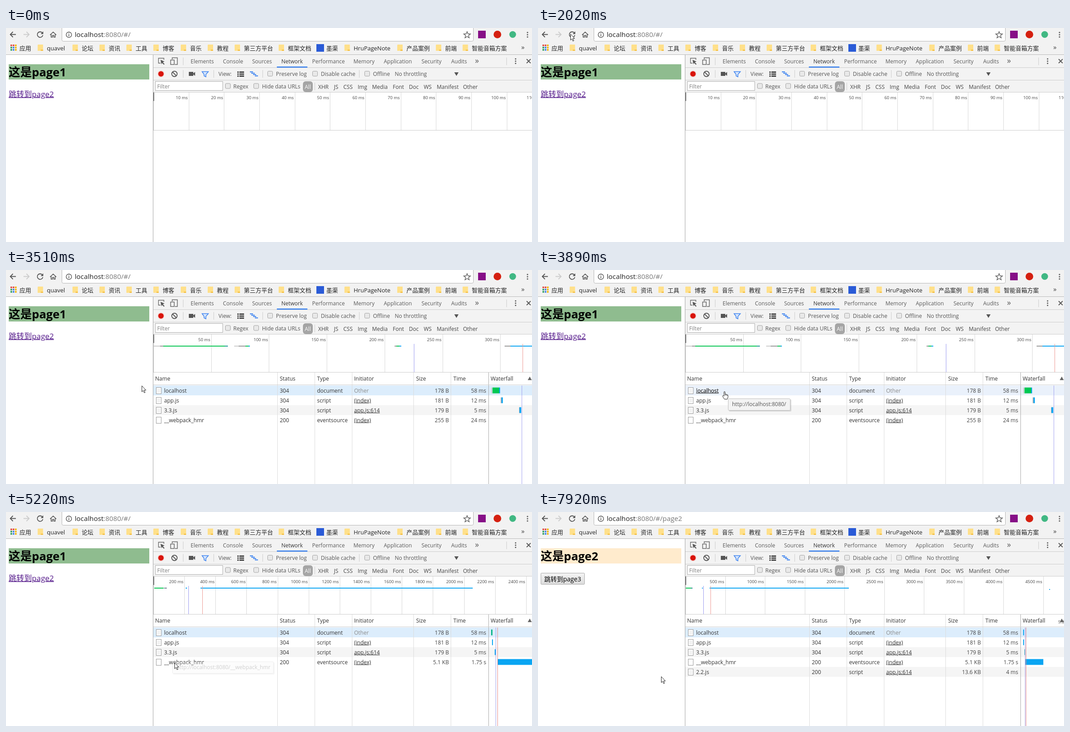
These frames come from a looping animation (1171 by 478 pixels, 8000 ms). An HTML page:

```html
<!DOCTYPE html>
<html lang="zh">
<head>
<meta charset="utf-8">
<title>Network panel</title>
<style>
  html, body { margin: 0; width: 100%; height: 100%; overflow: hidden; background: #fff; }
  svg { display: block; width: 1171px; height: 478px; font: 12px "Open Sans", "Noto Sans CJK SC", sans-serif; }
  text { white-space: pre; }
</style>
</head>
<body>
<svg id="stage" viewBox="0 0 1171 478"></svg>
<script>
const LOOP = 8000;
const stage = document.getElementById('stage');
const GREEN = '#09c653', BLUE = '#0aa5f2', TEAL = '#259a9a', GRAY = '#999', PALE = '#ccc';

// ---- timing ----
function play(el, prop, table, easing = () => 'step-end') {
  const frames = table.map(([t, value], i) =>
    ({ offset: t / LOOP, [prop]: value, easing: easing(table, i) }));
  return el.animate(frames, { duration: LOOP, iterations: Infinity });
}

// times: from, to, from, to ...
function show(el, times) {
  const table = times[0] ? [[0, 0]] : [];
  times.forEach((t, i) => { if (t < LOOP) table.push([t, i % 2 ? 0 : 1]); });
  table.push([LOOP, table[table.length - 1][1]]);
  play(el, 'opacity', table);
}

function add(markup, ...times) {
  const el = document.createElementNS('http://www.w3.org/2000/svg', 'g');
  el.innerHTML = markup;
  stage.append(el);
  if (times.length) show(el, times);
  return el;
}

// ---- shapes ----
const rect = (x, y, w, h, fill, more = '') =>
  `<rect x="${x}" y="${y}" width="${w}" height="${h}" fill="${fill}" ${more}/>`;
const frame = (x, y, w, h, fill, stroke, r = 0) =>
  rect(x + .5, y + .5, w - 1, h - 1, fill, `stroke="${stroke}" rx="${r}"`);
const text = (x, y, s, fill = '#333', more = '') =>
  `<text x="${x}" y="${y}" fill="${fill}" ${more}>${s}</text>`;
const path = (d, stroke, width = 1, fill = 'none') =>
  `<path d="${d}" stroke="${stroke}" stroke-width="${width}" fill="${fill}"/>`;
const circle = (x, y, r, fill, more = '') =>
  `<circle cx="${x}" cy="${y}" r="${r}" fill="${fill}" ${more}/>`;
const dots = (x, y) => [-5, 0, 5].map(d => circle(x, y + d, 1.6, '#5a5a5a')).join('');
const END = 'text-anchor="end"';
const UNDER = 'text-decoration="underline"';

// ---- browser bar ----
add(rect(0, 0, 1171, 59, '#f2f2f2') + rect(0, 59, 1171, 1, '#b9b9b9') +
  frame(124, -5, 917, 35, '#fff', '#b5b5b5', 3));
add(circle(76, 15, 17, '#e5e5e5'), 2460, 2990);
add(
  path('M22 14.5H10M15.5 8.5L9.5 14.5L15.5 20.5', '#555', 1.8) +
  path('M39 14.5H51M45.5 8.5L51.5 14.5L45.5 20.5', '#ccc', 1.8) +
  path('M80.5 10.5A6.2 6.2 0 1 0 82 16', '#555', 1.8) + path('M83 7.5V13.5H77Z', 'none', 0, '#555') +
  path('M98 15.5L105 9L112 15.5M100.5 14V20.5H103.5V16.5H106.5V20.5H109.5V14', '#555', 1.6) +
  circle(140, 15, 6, 'none', 'stroke="#555" stroke-width="1.4"') +
  rect(139.3, 14, 1.5, 4.5, '#555') + rect(139.3, 11.3, 1.5, 1.6, '#555') +
  path('M1026.500 8L1028.500 13L1034 13.300L1029.800 16.700L1031.200 22L1026.500 19L1021.800 22L1023.200 16.700L1019 13.300L1024.500 13Z', '#555', 1.3) +
  rect(1051, 6, 17, 17, '#860f86') + circle(1094, 14.5, 8.5, '#d5200f') + dots(1161, 15)
);
add(circle(1128, 14.5, 7.5, '#41b883'), 0, 2780, 3270, LOOP);
add(circle(1128, 14.5, 7.5, '#9a9a9a'), 2780, 3270);

const url = rest => text(153, 20, `localhost<tspan fill="#777">:8080/#/${rest}</tspan>`, '#222', 'font-size="15.3"');
add(url(''), 0, 7300);
add(url('page2'), 7300, LOOP);

// ---- bookmarks ----
const appColors = ['#e0483e', '#e0483e', '#f0b400', '#2f9e58', '#3f7ee8', '#f0b400', '#2f9e58', '#3f7ee8', '#f0b400'];
const bookmarks = [[91, 'quavel'], [168.5, '论坛'], [228.5, '资讯'], [288.5, '工具'], [348.5, '博客'],
  [409.5, '音乐'], [469.5, '教程'], [529.5, '第三方平台'], [627.5, '框架文档'], [713, '墨渠'],
  [774, 'HruPageNote'], [891.5, '产品案例'], [977.5, '前端'], [1037, '智能音箱方案']];
const folder = x => path(`M${x} 38.500Q${x} 37 ${x + 1} 37H${x + 12}V51H${x}Z`, 'none', 0, '#ffe08a') +
  path(`M${x + 7} 51V48.500H${x + 12}V51Z`, 'none', 0, '#f5bd3c');
add(
  appColors.map((c, i) => rect(10 + i % 3 * 5, 37 + (i / 3 | 0) * 5, 3.6, 3.6, c)).join('') +
  `<g font-size="13">` + text(30, 49.5, '应用', '#222') +
  bookmarks.map(([x, s]) =>
    (s === '墨渠' ? rect(691, 36, 17, 17, '#2a5bd7') : folder(x - 20.5)) + text(x, 49.5, s, '#222')).join('') +
  text(1147, 48, '»', '#444', 'font-size="15"') + '</g>'
);

// ---- web page ----
const heading = (color, n) => rect(6, 81, 313, 34, color) +
  text(6, 107.5, '这是page' + n, '#000', 'font-size="25.8" font-weight="bold"');
const link = color => text(6, 153.5, '跳转到page2', color, `font-size="17.2" ${UNDER}`);
add(heading('#8fbc8f', 1), 0, 2860, 3190, 7300);
add(link('#551a8b'), 0, 2860, 3190, 7160);
add(link('#e00'), 7160, 7300);
add(heading('#ffebcd', 2) + '<linearGradient id="face" x2="0" y2="1"><stop stop-color="#f4f4f4"/>' +
  '<stop offset="1" stop-color="#dcdcdc"/></linearGradient>' +
  frame(6, 136, 98, 26, 'url(#face)', '#a5a5a5', 1) +
  text(14, 154.5, '跳转到page3', '#000', 'font-size="14"'), 7300, LOOP);

// ---- developer tools ----
const tabs = [[411, 'Elements'], [483, 'Console'], [548, 'Sources'], [613, 'Network'], [681.5, 'Performance'],
  [773.5, 'Memory'], [841, 'Application'], [925, 'Security'], [991, 'Audits']];
const types = [[695, 'XHR'], [730, 'JS'], [751, 'CSS'], [783, 'Img'], [815, 'Media'], [861, 'Font'],
  [897, 'Doc'], [930, 'WS'], [959, 'Manifest'], [1017.5, 'Other']];
const check = (x, y, label, tx) => frame(x, y, 12, 12, '#e9e9e9', '#a2a2a2', 2) + text(tx, y + 11, label, '#555');
const split = (x, y, h = 17) => rect(x, y, 1, h, '#ccc');
add(
  rect(328, 60, 843, 84, '#f3f3f3') + rect(327, 60, 1, 418, '#a3a3a3') +
  [88, 116, 143, 228].map(y => rect(328, y, 843, 1, '#ccc')).join('') +
  tabs.map(([x, s]) => text(x, 78.5, s, s === 'Network' ? '#333' : '#5a5a5a')).join('') +
  rect(603, 86, 68, 2.5, '#3b82f0') + text(1044, 79, '»', '#5a5a5a', 'font-size="18"') +
  path('M344 78.500H339.500V67.500H351.500V71', '#666', 1.4) + path('M344 71L353 75L349 76.500L353 80.500L351.500 82L347.500 78L346 81Z', 'none', 0, '#555') +
  path('M370 70V66.500H381.500V81.500H376M366.500 71.500H374.500V81.500H366.500Z', '#666', 1.5) +
  split(394, 66) + split(1114, 66) + dots(1134.5, 74) + path('M1159 69.500L1168 78.500M1168 69.500L1159 78.500', '#555', 1.8)
);
add(
  circle(345, 102.5, 7.5, '#f5cfcc') + circle(345, 102.5, 6, '#d9140c') +
  circle(375, 102.5, 6, 'none', 'stroke="#555" stroke-width="1.8"') + path('M371 98.500L379 106.500', '#555', 1.8) +
  [394, 462, 571, 786].map(x => split(x, 94)).join('') +
  rect(407, 98, 10, 9, '#555') + path('M416 102.500L421 98V107Z', 'none', 0, '#555') +
  path('M436.500 97.500H450.500L445 103.500V109L441 107V103.500Z', '#3b82f0', 1.5, '#dce9fc') +
  text(473, 107, 'View:', '#555') +
  [97, 101.5, 106].map(y => rect(515, y, 3, 3, '#444') + rect(519.5, y, 10.5, 3, '#444')).join('') +
  rect(543, 97, 7, 2, '#3b82f0') + rect(546, 100, 8, 2, '#3b82f0') + rect(550, 103, 7, 2, '#3b82f0') + rect(554, 106, 7, 2, '#3b82f0') +
  check(582, 96, 'Preserve log', 601) + check(682, 96, 'Disable cache', 701) + check(798, 96, 'Offline', 817) +
  text(865.5, 107, 'No throttling', '#555') + path('M998 99H1007.500L1002.800 107Z', 'none', 0, '#555') +
  frame(332, 119, 151, 21, '#fff', '#adadad') + text(336.5, 135, 'Filter', '#808080') +
  check(488, 123.5, 'Regex', 506) + check(551, 123.5, 'Hide data URLs', 570) +
  rect(661, 119, 22, 24, '#a5a5a5', 'rx="6"') + text(665, 135.5, 'All', '#fff') + split(687, 122) +
  types.map(([x, s]) => text(x, 135.5, s, '#444')).join('')
);

// ---- timeline overview ----
function overview(gap, unit, bars, marks, ...times) {
  let out = '';
  for (let i = 1; i * gap < 900; i++) {
    const x = 328.5 + i * gap;
    out += rect(Math.round(x - .5), 144, 1, 84, '#d8d8d8') +
      text(x - 2.5, 159, i * unit + ' ms', '#444', `font-size="9.5" ${END}`);
  }
  out += bars.map(([a, b, c, y = 169]) => rect(a, y, b - a, 2, c)).join('');
  out += marks.map((x, i) => rect(x, 165, 1, 63, i ? '#ee9a94' : '#9a9af0')).join('');
  add(out, ...times);
}
add(rect(328, 144, 1, 84, '#ccc') + rect(328, 144, 2, 19, '#777'));
overview(78.65, 10, [], [], 0, 2780);
overview(78.65, 10, [[329, 376, PALE], [376, 396, GRAY], [396, 407, '#6f8f80'], [410, 824, GREEN], [824, 833, TEAL]], [], 2780, 3060);
overview(128.7, 50, [[329, 343, PALE], [343, 350, GRAY], [350, 487, GREEN], [487, 494, TEAL], [508, 518, PALE],
  [518, 533, GRAY], [533, 540, GREEN], [540, 543, BLUE], [865, 869, GRAY], [869, 876, GREEN], [876, 880, BLUE],
  [1110, 1123, GRAY], [1123, 1171, BLUE]], [908, 1150], 3060, 4690);
overview(69.15, 200, [[330, 351, GREEN], [352, 358, '#789'], [400, 403, BLUE], [433, 1039, BLUE]], [406, 437], 4690, 7300);
overview(88.5, 500, [[329, 341, GREEN], [341, 344, '#389'], [365, 367, BLUE], [382, 692, BLUE], [1138, 1140, BLUE, 172]], [368, 384], 7300, LOOP);

// ---- request table ----
const rowTop = i => 258 + 22 * i;
const columns = [[332, 'Name'], [609.5, 'Status'], [692.5, 'Type'], [775, 'Initiator'], [913, 'Size'], [996, 'Time'], [1079, 'Waterfall']];
const FOUR = 3060, LOADED = 4690, NEXT = 7300;
const requests = [
  ['localhost', 304, 'document', 'Other', '178 B', '58 ms', 2780],
  ['app.js', 304, 'script', '(index)', '181 B', '12 ms', FOUR],
  ['3.3.js', 304, 'script', 'app.js:614', '179 B', '5 ms', FOUR],
  ['__webpack_hmr', 200, 'eventsource', '(index)', '', '', FOUR],
  ['2.2.js', 200, 'script', 'app.js:614', '13.6 KB', '4 ms', NEXT]
];
const hovers = { 0: [3740, 4060], 2: [6140, 6330], 3: [4370, 4690, 5310, 6140] };
const sizeTime = (i, size, time) =>
  text(986, rowTop(i) + 15.5, size, '#444', END) + text(1069, rowTop(i) + 15.5, time, '#444', END);

requests.forEach(([name, status, type, origin, size, time, start], i) => {
  const y = rowTop(i), base = y + 15.5;
  const fill = i === 0 ? '#dcedfc' : i % 2 ? '#fff' : '#f5f5f5';
  add(rect(328, y, 843, 22, fill), start, LOOP);
  if (hovers[i]) add(rect(328, y, 843, 22, '#eaf1fb') + text(352, base, name, '#333', UNDER), ...hovers[i]);
  add(frame(334, y + 4, 12, 15, '#fff', '#999') +
    (i === 3 ? '' : path(`M337 ${y + 8.5}H343M337 ${y + 11.5}H343M337 ${y + 14.5}H343`, '#ddd')) +
    text(352, base, name) + text(609.5, base, status) + text(692.5, base, type) +
    text(775, base, origin, i ? '#333' : '#8a8a8a', i ? UNDER : '') + sizeTime(i, size, time), start, LOOP);
});
add(sizeTime(3, '255 B', '24 ms'), FOUR, LOADED);
add(sizeTime(3, '5.1 KB', '1.75 s'), LOADED, LOOP);

// bars: row, left, right, colour
function waterfall(bars, marks, ...times) {
  add(bars.map(([row, a, b, c]) => rect(a, rowTop(row) + 4.5, b - a, 13, c)).join('') +
    marks.map((x, i) => rect(x, 258, 1, 220, i ? '#e58a86' : '#a3a3f0')).join(''), ...times);
}
add(
  [604, 687, 770, 907, 990].map(x => rect(x, 229, 1, 249, '#dcdcdc')).join('') + rect(1074, 229, 1, 249, '#aaa') +
  rect(328, 256, 843, 1, '#ccc') + columns.map(([x, s]) => text(x, 247, s)).join('') +
  path('M1161.500 246L1166 238L1170.500 246Z', 'none', 0, '#666'), 2780, LOOP
);
add(frame(1080, 265, 6, 8, '#fff', '#bbb') + rect(1086, 265, 4, 8, GRAY), 2780, FOUR);
waterfall([[0, 1090, 1142, '#00c853'], [0, 1141, 1145, TEAL]], [], 2780, FOUR);
waterfall([[0, 1080, 1082, PALE], [0, 1083, 1098, '#00c853'], [0, 1098, 1100, BLUE], [1, 1101, 1103, '#bbb'],
  [1, 1103, 1106, BLUE], [2, 1142, 1143, '#bbb'], [2, 1143, 1147, BLUE]], [1148], FOUR, LOADED);
waterfall([[0, 1080, 1083, '#0bb58a'], [1, 1082, 1084, BLUE], [2, 1088, 1090, BLUE], [3, 1094, 1171, BLUE]], [1090, 1094], LOADED, NEXT);
waterfall([[0, 1080, 1082, BLUE], [1, 1080, 1082, BLUE], [2, 1083, 1085, '#3aa5b0'], [3, 1085, 1125, BLUE]], [1084, 1086], NEXT, LOOP);
add(text(1158, 249, '5.0', '#555', 'font-size="9.5"'), NEXT, LOOP);

// ---- tooltips ----
function tip(x, y, w, address, opacity, ...times) {
  add(`<g opacity="${opacity}">` + rect(x + 2, y + 2, w, 27, '#000', 'opacity=".13" rx="2"') +
    frame(x, y, w, 27, '#f3f3f3', '#bfbfbf', 2) +
    text(x + 9, y + 17, 'http://localhost:8080/' + address, '#575757') + '</g>', ...times);
}
add(frame(71, 29, 226, 21, '#f7f7f7', '#b0b0b0') +
  text(75, 44, '点击可重新加载此页，按住可查看更多选项', '#575757', 'font-size="11.4"'), 2180, 2550);
tip(423, 287, 139, '', 1, 3890, 4060);
tip(370, 334, 226, '__webpack_hmr', .28, 5130, 5310);
tip(431, 347, 226, '__webpack_hmr', 1, 5470, 6140);
tip(414, 333, 167, '3.3.js', 1, 6240, 6410);

// ---- pointer ----
const arrow = path('M.500 .700V14L3.500 11.200L5.700 16.300L7.800 15.400L5.600 10.400H9.600Z', '#222', 1, '#fff');
const hand = path('M4 9.500V2Q4 .500 5.200 .500T6.500 2V6.500Q8.500 5.500 9 7Q10.800 6.300 11.200 7.800Q13 7.500 13 9.500V13L11.500 17.500H5L1 11.500Q.200 10 1.500 9.500T4 11Z', '#222', 1, '#fff') +
  path('M6.500 6.500V9.500M9 7V9.500M11.200 8V10', '#222', .9);
const pointer = add('', 510, LOOP);
const hands = [3740, 4060, 5310, 6330, 6950, 7620];
for (const [shape, times] of [[arrow, [0, ...hands, LOOP]], [hand, hands]]) {
  const el = add(shape, ...times);
  pointer.append(el);
}
const route = [[0, 646, 449], [510, 646, 449], [980, 180, 110], [1090, 160, 94], [1310, 108, 54], [1400, 105, 50],
  [1860, 72, 13], [2860, 72, 13], [3510, 302, 258], [3890, 410, 271], [3970, 410, 271], [4370, 404, 343],
  [5220, 375, 336], [5310, 384, 335], [5550, 421, 340], [5760, 428, 340], [5930, 450, 341], [6060, 450, 341],
  [6140, 404, 318], [6240, 365, 318], [6320, 365, 318], [6840, 79, 158], [6950, 82, 155], [7160, 84, 152],
  [7540, 84, 152], [7920, 274, 367], [LOOP, 274, 367]];
play(pointer, 'transform', route.map(([t, x, y]) => [t, `translate(${x}px,${y}px)`]),
  (table, i) => i + 1 < table.length ? `steps(${Math.max(1, Math.round((table[i + 1][0] - table[i][0]) / 80))})` : 'linear');
</script>
</body>
</html>
```
